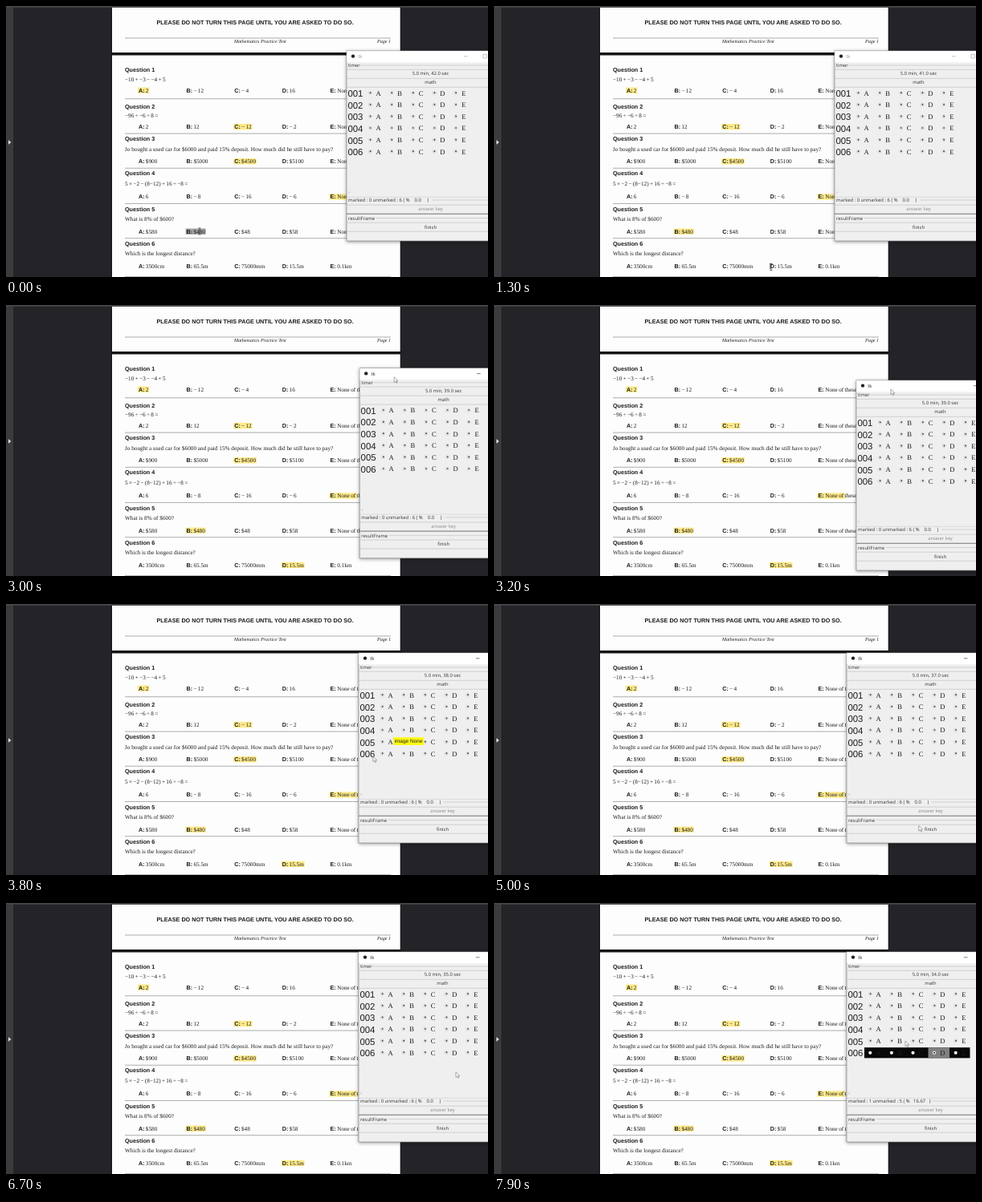
Write an HTML page that moves like this. It is 600 px wide and 338 px high and loops after 8 s.

```html
<!DOCTYPE html>
<html lang="en">
<head>
<meta charset="utf-8">
<title>Answer sheet</title>
<style>
  html, body { margin: 0; width: 100%; height: 100%; overflow: hidden; background: #242328; }
  svg { display: block; width: 600px; height: 338px; }
  text { white-space: pre; text-rendering: geometricPrecision; fill: #1c1c1c; }
  .bold { font: bold 7.23px "Liberation Sans", Arial, sans-serif; }
  .body { font: 7.23px "Liberation Serif", "Times New Roman", serif; }
  .math { word-spacing: -.45px; }
  .foot { font: italic 6.1px "Liberation Serif", "Times New Roman", serif; }
  .ui { font: 5.9px "Open Sans", "Noto Sans", sans-serif; fill: #333; }
  .tip { font: 6.5px "Liberation Sans", Arial, sans-serif; }
  .num { font: 11.4px "Liberation Sans", Arial, sans-serif; }
  .letter { font: 8.6px "Liberation Serif", "Times New Roman", serif; }
  .mid { text-anchor: middle; }
  .dim { fill: #8c8c8c; }
  #win { filter: drop-shadow(0 1px 2px rgba(0, 0, 0, .4)); }
</style>
</head>
<body>
<svg id="stage" viewBox="0 0 600 338"></svg>
<script>
const LOOP = 8000, STEP = 100;
const WIN = { x: 424, y: 56, w: 208, h: 237 };
const MID = WIN.w / 2 + .5;
const LETTERS = [...'ABCDE'];
const YELLOW = '#feea8a', GREY = '#a3a6a3', DARK = '#242328';

const rect = (x, y, w, h, fill, extra = '') =>
  `<rect x="${x}" y="${y}" width="${w}" height="${h}" fill="${fill}" ${extra}/>`;
const text = (x, y, cls, str, extra = '') =>
  `<text x="${x}" y="${y}" class="${cls}" ${extra}>${str}</text>`;
const rule = (x1, x2, y, color, w = .6) =>
  `<path d="M${x1} ${y}H${x2}" stroke="${color}" stroke-width="${w}"/>`;
const dot = (x, y, r, fill, extra = '') =>
  `<circle cx="${x}" cy="${y}" r="${r}" fill="${fill}" ${extra}/>`;

// lead: title to answers; gap: answers to the next title
const questions = [
  { lead: 25.3, gap: 20.4, key: 0, prompt: '−10 + −3 − −4 + 5', answers: '2|− 12|− 4|16' },
  { lead: 25, key: 2, prompt: '−96 ÷ −6 ÷ 8 =', answers: '2|12|− 12|− 2' },
  { key: 2, prompt: 'Jo bought a used car for $6000 and paid 15% deposit. How much did he still have to pay?',
    answers: '$900|$5000|$4500|$5100' },
  { lead: 29, key: 4, prompt: '5 × −2 − (8−12) + 16 ÷ −8 =', answers: '6|− 8|− 16|− 6' },
  { key: 1, prompt: 'What is 8% of $600?', answers: '$580|$480|$48|$58' },
  { gap: 27, key: 3, prompt: 'Which is the longest distance?', answers: '3500cm|65.5m|75000mm|15.5m|0.1km' }
];

function sheet() {
  let y = 82.3;
  return questions.map(({ lead = 28, gap = 15.2, key, prompt, answers }, i) => {
    const ay = y + lead, labels = answers.split('|');
    const math = /[+=]/.test(prompt) ? ' math' : '';
    const options = LETTERS.map((ch, c) => {
      const x = 165 + c * 59.6;
      return (c == key ? rect(x - 1, ay - 6.1, 0, 7.4, YELLOW, `id="mark${i}"`) : '') +
        text(x, ay, 'bold', ch + ':') +
        text(x + 8.8, ay, 'body math', labels[c] || 'None of these', c == key ? `id="key${i}"` : '');
    }).join('');
    const block = text(148, y, 'bold', `Question ${i + 1}`) +
      text(148, ay - lead * .55, 'body' + math, prompt) + options +
      rule(148, 479, ay + gap * .4, '#777');
    y = ay + gap;
    return block;
  }).join('');
}

function page() {
  return rect(0, 0, 600, 338, DARK) + rect(0, 0, 9, 338, '#3b3b3d') + rect(0, 0, 600, 1.8, '#48484a') +
    '<path d="M3 167.2l3.4 2.8-3.4 2.8z" fill="#ddd"/>' +
    rect(131, 2, 360.5, 336, '#121215') + rect(132, 2, 358.7, 56, '#fefdfe') + rect(132, 61.5, 358.7, 277, '#fefdfe') +
    text(187.5, 23.3, 'bold', 'PLEASE DO NOT TURN THIS PAGE UNTIL YOU ARE ASKED TO DO SO.') +
    rule(148, 479, 40, '#777') +
    text(284, 45.5, 'foot', 'Mathematics Practice Test') + text(462, 45.5, 'foot', 'Page 1') + sheet();
}

const rowY = i => 53 + i * 14.6;
const radioX = c => 29.3 + c * 26.6;

function row(i) {
  const y = rowY(i);
  return text(1.4, y + 4.1, 'num', `00${i + 1}`) + LETTERS.map((ch, c) =>
    dot(radioX(c), y - .5, 1.9, '#fff', 'stroke="#aaa" stroke-width=".5"') +
    dot(radioX(c) + .3, y - .7, .95, '#333') +
    text(radioX(c) + 10.2, y + 2.6, 'letter mid', ch)).join('');
}

function markedRow() {
  const y = rowY(5);
  return `<g id="marked">${rect(22, y - 6.8, 131.5, 13.2, '#080808')}` +
    rect(101.5, y - 6.8, 26.5, 13.2, '#808080') +
    LETTERS.map((ch, c) => dot(radioX(c), y - .2, 2.1, '#f4f4f4') +
      text(radioX(c) + 10.2, y + 2.7, 'letter mid', ch)).join('') +
    dot(radioX(3), y - .2, 1, '#222') + '</g>';
}

const bars = (y, n) => Array.from({ length: n }, (_, i) => rule(0, WIN.w, y + i * 11, '#bbb')).join('');
const group = (y, x, label, extra) => rule(x, WIN.w, y, '#bbb') + text(2, y + 2.2, 'ui', label, extra);

function panel() {
  return '<g id="win">' +
    rect(0, 0, WIN.w, WIN.h, '#f0eff0', 'stroke="#8a8a8a" stroke-width=".7"') +
    rect(.3, .3, WIN.w - .6, 14, '#fff') + dot(8, 6.6, 2.2, '#222') +
    `<g id="chrome">${text(14.2, 8.9, 'ui', 'tk', 'style="fill:currentColor"')}` +
    '<path d="M146 6.8h4.5M170 4.5h4.4v4.4H170z" fill="none" stroke="currentColor" stroke-width=".6"/></g>' +
    group(18, 17, 'timer') + bars(23.3, 3) +
    text(MID, 30, 'ui mid', '', 'id="clock"') + text(MID, 41.2, 'ui mid', 'math') +
    questions.map((_, i) => row(i)).join('') + markedRow() +
    text(2, 178, 'ui dim', '‹') + rule(0, WIN.w, 182.3, '#ccc') +
    group(186, 106, '', 'id="tally"') + bars(192.2, 4) + rule(0, WIN.w, 203.3, '#777', .9) +
    text(MID, 199, 'ui mid dim', 'answer key') +
    group(208.6, 37, 'resultFrame') + text(MID, 221.6, 'ui mid', 'finish') + '</g>';
}

const stage = document.getElementById('stage');
stage.innerHTML = page() + panel() +
  `<g id="hint">${rect(482, 166.2, 38, 9.8, '#fffb14')}${text(501, 173.2, 'tip mid', 'image None')}</g>` +
  '<path id="arrow" d="M0 0V6.6L1.6 5.2 2.7 7.6 3.8 7.1 2.7 4.8H4.8Z" fill="#fff" stroke="#555" stroke-width=".5"/>' +
  '<path id="beam" d="M-1.6-4H1.6M0-4V4M-1.6 4H1.6" fill="none" stroke="#333" stroke-width=".7"/>';

const el = {};
stage.querySelectorAll('[id]').forEach(n => el[n.id] = n);

// highlights reach over the first words of each chosen answer
const markWidth = questions.map((_, i) => {
  const key = el['key' + i];
  const w = 10.6 + key.getSubStringLength(0, Math.min(8, key.textContent.length));
  el['mark' + i].setAttribute('width', w);
  return w;
});

// each move: start, end, x, y
const drag = [[2700, 3200, 27, 38], [3200, 3500, 15, 5]];
const grip = [467, 67];
const pointer = [
  [300, 1100, 345, 325.5], [1300, 1800, 372, 325], [2100, 2500, 455.5, 80], [2500, 2700, ...grip],
  ...drag.map(([a, b, x, y]) => [a, b, grip[0] + x, grip[1] + y]),
  [3500, 3800, 457, 190], [4200, 4800, 528.8, 276.5], [6500, 6700, 560, 210.8],
  [6700, 7100, 551, 185], [7300, 7500, 512, 172]
];

function at(moves, t, from) {
  return moves.reduce(([px, py], [a, b, x, y]) => {
    const k = Math.min(1, Math.max(0, (t - a) / (b - a)));
    return [px + (x - px) * k, py + (y - py) * k];
  }, from);
}

const show = (node, on) => node.setAttribute('display', on ? 'inline' : 'none');
const move = (node, x, y) => node.setAttribute('transform', `translate(${x} ${y})`);

function draw(t) {
  const [px, py] = at(pointer, t, [241, 281]), [dx, dy] = at(drag, t, [0, 0]);
  const overText = t < 2300, done = t >= 7200;

  show(el.beam, overText);
  show(el.arrow, !overText);
  move(overText ? el.beam : el.arrow, px, py);
  move(el.win, WIN.x + dx, WIN.y + dy);
  el.chrome.setAttribute('color', t < 2700 ? '#999' : '#222');

  el.mark4.setAttribute('fill', t < 300 ? GREY : YELLOW);
  el.mark5.setAttribute('fill', t < 2000 ? GREY : YELLOW);
  el.mark5.setAttribute('width', t < 1300 ? 0 : Math.min(markWidth[5], px - 343));

  el.clock.textContent = `5.0 min, ${42 - Math.floor((t + 600) / 1000)}.0 sec`;
  el.tally.textContent = done
    ? 'marked : 1 unmarked : 5 ( %   16.67   )'
    : 'marked : 0 unmarked : 6 ( %    0.0     )';
  show(el.marked, done);
  show(el.hint, t >= 3600 && t < 4300);
}

const start = performance.now();
function tick() {
  const t = Math.max(0, performance.now() - start) % LOOP;
  draw(Math.floor(t / STEP) * STEP);
  requestAnimationFrame(tick);
}
tick();
</script>
</body>
</html>
```
